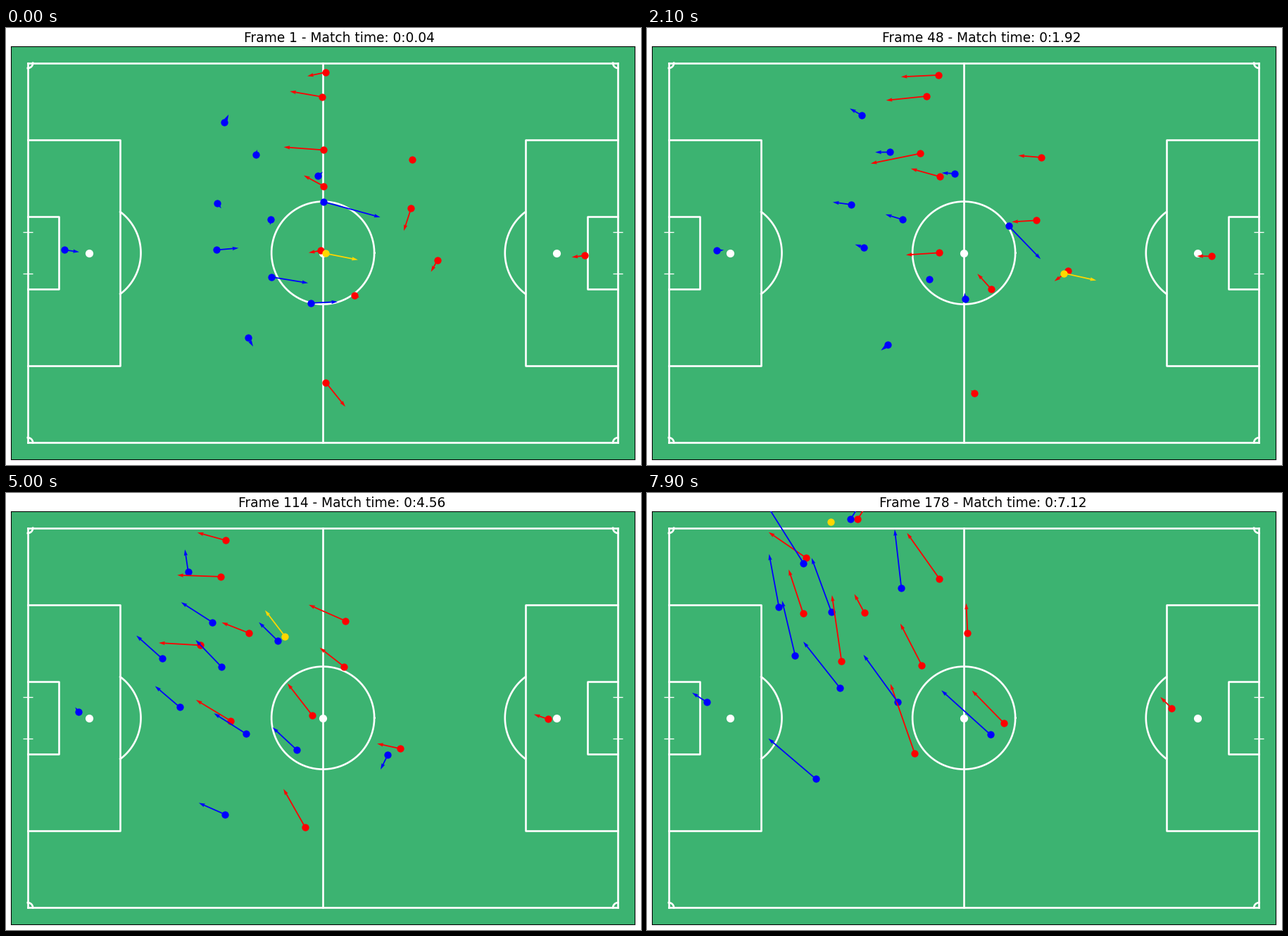
These frames come from a looping animation (902 px wide and 621 px high, 8 s). A matplotlib script:

```python
import numpy as np
import matplotlib.pyplot as plt
from matplotlib.animation import FuncAnimation

W, H, DPI = 902, 621, 100
K = 0.9535                      # overall scale of point sizes
YARD = 0.9144
HALF_L, HALF_W, MARGIN = 52.5, 33.8, 3
LEFT, RIGHT, TOP, BOTTOM = 6.9, 893.4, 25.8, 613.4

# Steps of 100 ms against data rows (25 rows per second)
STEPS = [0, 14, 21, 33, 50, 62, 79]
ROWS = [1, 32, 48, 76, 114, 142, 178]

KEY_ROWS = np.array([1, 48, 114, 178.0])   # rows of the points on each run
LOOK_AHEAD = 47                            # rows of travel a player's arrow spans
BALL_ARROW = 47 * 0.125                    # fixed length in metres


def pt(px):
    return px * 72 / DPI


def to_pitch(xy):
    """Stage pixels to metres from the centre spot."""
    sx = 2 * (HALF_L + MARGIN) / (RIGHT - LEFT)
    sy = 2 * (HALF_W + MARGIN) / (BOTTOM - TOP)
    mid = np.array([(LEFT + RIGHT) / 2, (TOP + BOTTOM) / 2])
    return (np.asarray(xy, float) - 0.6 - mid) * [sx, -sy]


fig = plt.figure(figsize=(W / DPI, H / DPI), dpi=DPI, facecolor="white")
ax = fig.add_axes([LEFT / W, 1 - BOTTOM / H, (RIGHT - LEFT) / W, (BOTTOM - TOP) / H],
                  facecolor="mediumseagreen")
ax.set(xlim=(-HALF_L - MARGIN, HALF_L + MARGIN),
       ylim=(-HALF_W - MARGIN, HALF_W + MARGIN), xticks=[], yticks=[])
for spine in ax.spines.values():
    spine.set_linewidth(0.8 * K)


def line(x, y):
    ax.plot(x, y, color="white", lw=2 * K)


def arc(cx, cy, r, a0, a1):
    a = np.radians(np.linspace(a0, a1, 90))
    line(cx + r * np.cos(a), cy + r * np.sin(a))


def spot(x):
    ax.plot(x, 0, "o", color="white", ms=pt(11.2), mew=0)


def draw_pitch():
    line([0, 0], [-HALF_W, HALF_W])
    arc(0, 0, 10 * YARD, 0, 360)
    spot(0)
    for y in (-HALF_W, HALF_W):
        line([-HALF_L, HALF_L], [y, y])
    d_angle = np.degrees(np.arcsin(0.8))
    for s in (-1, 1):
        goal = s * HALF_L
        line([goal, goal], [-HALF_W, HALF_W])
        for depth, half in ((18 * YARD, 20.15), (6 * YARD, 6.45)):
            x = goal - s * depth
            line([goal, x, x, goal], [-half, -half, half, half])
        centre = goal - s * 12 * YARD
        spot(centre)
        facing = 180 if s > 0 else 0
        arc(centre, 0, 10 * YARD, facing - d_angle, facing + d_angle)
        ax.plot([goal] * 2, [-4 * YARD, 4 * YARD], "_", color="white", ms=10, mew=K)
        for t in (-1, 1):
            mid_angle = np.degrees(np.arctan2(-t, -s))
            arc(goal, t * HALF_W, YARD, mid_angle - 45, mid_angle + 45)


def run_state(points, row):
    """Position and speed per row on smooth curves through the key points."""
    slope = np.gradient(points, KEY_ROWS, axis=1, edge_order=2)
    k = min(np.searchsorted(KEY_ROWS, row, "right") - 1, len(KEY_ROWS) - 2)
    span = KEY_ROWS[k + 1] - KEY_ROWS[k]
    u = (row - KEY_ROWS[k]) / span
    a, step = points[:, k], points[:, k + 1] - points[:, k]
    ma, mb = slope[:, k] * span, slope[:, k + 1] * span
    pos = a + step * u * u * (3 - 2 * u) + ma * u * (1 - u) ** 2 - mb * u * u * (1 - u)
    vel = 6 * u * (1 - u) * step + ma * (1 - u) * (1 - 3 * u) - mb * u * (2 - 3 * u)
    return pos, vel / span


def ball_state(row):
    """Straight passes at even pace; at rest once out of play."""
    k = np.searchsorted(BALL_ROWS, row, "right") - 1
    if k >= len(BALL_ROWS) - 1:
        return BALL[-1:], np.zeros((1, 2))
    u = (row - BALL_ROWS[k]) / (BALL_ROWS[k + 1] - BALL_ROWS[k])
    step = BALL[k + 1] - BALL[k]
    return (BALL[k] + step * u)[None], (step / np.hypot(*step) * BALL_ARROW)[None]


class Markers:
    """Dots of one colour with their velocity arrows."""

    def __init__(self, color, count, z_dot, z_arrow):
        zero = np.zeros(count)
        self.dots, = ax.plot(zero, zero, "o", color=color, ms=pt(10.3), mew=0, zorder=z_dot)
        self.arrows = ax.quiver(zero, zero, zero, zero, color=color, angles="xy",
                                scale_units="xy", scale=1, width=0.002,
                                headwidth=3, headlength=5, zorder=z_arrow)

    def show(self, pos, arrow):
        self.dots.set_data(pos[:, 0], pos[:, 1])
        self.arrows.set_offsets(pos)
        self.arrows.set_UVC(arrow[:, 0], arrow[:, 1])


def team(*runs):
    return to_pitch(runs)


BLUE = team(
    [(84, 316), (99.5, 317), (104, 312), (86, 298)],
    [(311, 135), (305.5, 124.5), (259.5, 113), (290, 37.5)],
    [(356, 180.5), (346, 177), (294, 184.5), (223, 100.5)],
    [(444, 211), (438, 207.5), (387, 211), (362, 136)],
    [(300.5, 249.5), (290.5, 251.5), (222.5, 236), (188, 162.5)],
    [(377, 273), (364, 273), (306.5, 247.5), (262.5, 169.5)],
    [(300, 316), (309, 312.5), (247.5, 305), (211, 231.5)],
    [(378, 354.5), (402, 357.5), (342, 343), (275, 278)],
    [(434, 391.5), (452.5, 386), (414, 366), (357, 298)],
    [(451.5, 247.5), (514.5, 282), (543, 372.5), (488.5, 344)],
    [(344.5, 441), (343, 451), (312, 457.5), (240.5, 407)])

RED = team(
    [(455, 63.5), (415, 67.5), (313, 68), (300, 37.5)],
    [(450, 98.5), (398, 97.5), (305.5, 119.5), (227, 93)],
    [(452, 174), (388.5, 179), (277, 217), (222.5, 172)],
    [(452, 225.5), (417, 212), (345.5, 199.5), (309.5, 171)],
    [(578, 188), (561, 184.5), (483, 182.5), (416, 122.5)],
    [(576, 257), (553.5, 274), (481, 247.5), (456, 200)],
    [(447.5, 317), (415.5, 320), (320, 324.5), (277, 240)],
    [(496, 381), (489.5, 371.5), (436, 317), (391, 245.5)],
    [(613.5, 330.5), (599, 346), (561, 364), (507.5, 327.5)],
    [(823, 324), (803, 325), (771, 322), (746, 306.5)],
    [(455, 504.5), (466, 519.5), (425.5, 475.5), (381, 371)])

BALL_ROWS = [1, 32, 50, 82, 114, 142, 177]
BALL = to_pitch([(454.5, 321), (561, 342), (597, 350), (571, 368),
                 (397, 204.5), (322.5, 107), (262, 41.5)])

draw_pitch()
teams = [(RED, Markers("red", len(RED), 2.5, 3)),
         (BLUE, Markers("blue", len(BLUE), 2.5, 3))]
ball = Markers("gold", 1, 5, 4)
title = fig.text(0, 1 - 20 / H, "", fontsize=pt(18.6), family="DejaVu Sans",
                 ha="left", va="baseline")


def update(i):
    row = 2 * round(np.interp(i, STEPS, ROWS) / 2) if i else 1
    for runs, markers in teams:
        pos, vel = run_state(runs, row)
        markers.show(pos, vel * LOOK_AHEAD)
    ball.show(*ball_state(row))
    title.set_text(f"Frame {row} - Match time: 0:{row * 0.04:.2f}")
    title.set_x((342.2 - 4 * len(str(row))) / W)
    return []


anim = FuncAnimation(fig, update, frames=80, interval=100, repeat=True, repeat_delay=0)
plt.show()
```
